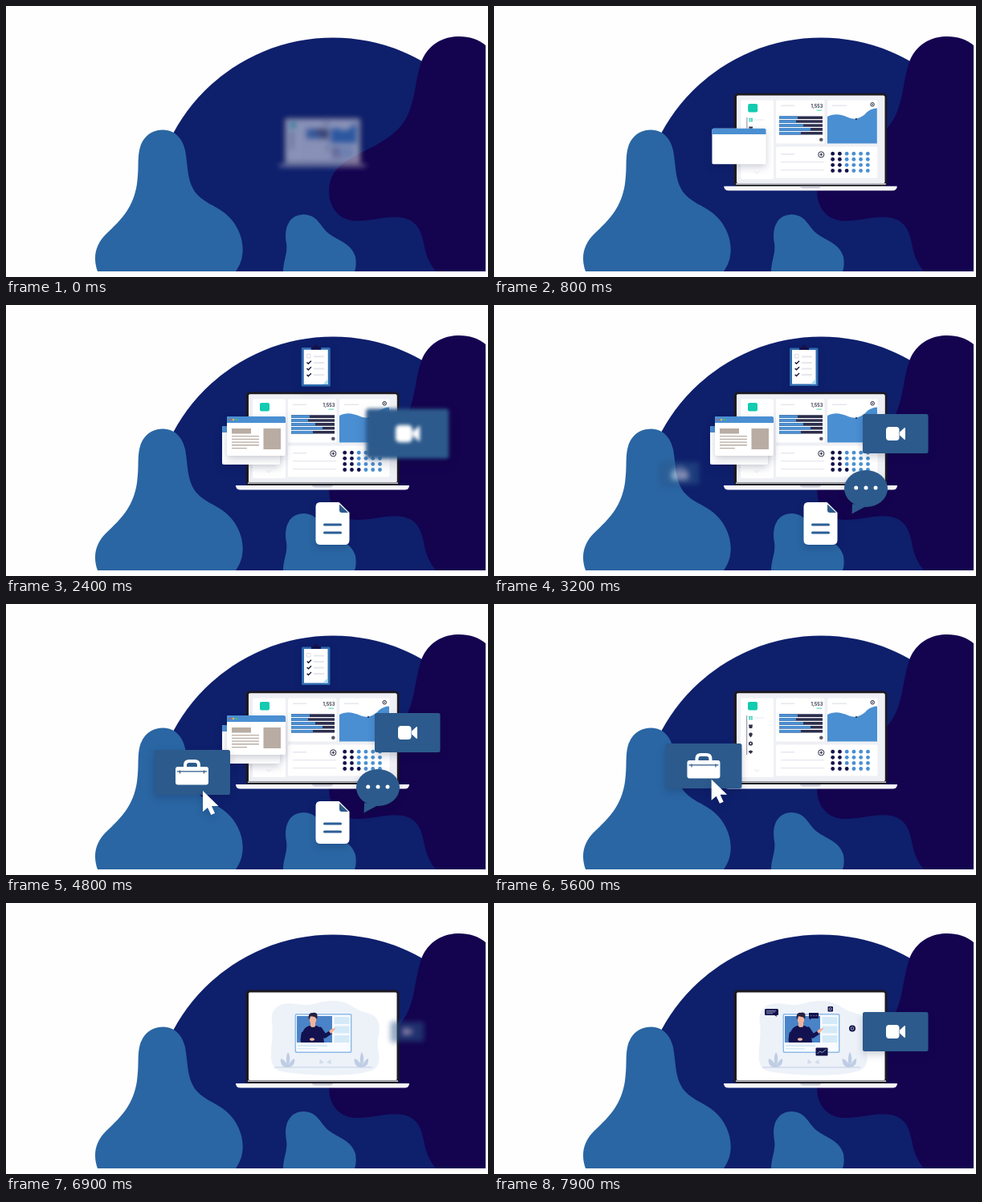
Animation, 600 px wide and 338 px high, one loop 8000 ms. Source, as an HTML page:

```html
<!DOCTYPE html>
<html lang="en">
<head>
<meta charset="utf-8">
<title>Workspace</title>
<style>
html, body { margin: 0; width: 100%; height: 100%; overflow: hidden; background: #fefefe; }
svg { display: block; width: 600px; height: 338px; }
text { font: 700 5.6px Inter, Arial, sans-serif; }
.w { fill: #fff } .n { fill: #14124a } .b { fill: #4a8fd2 } .k { fill: #2c5a8c }
.s { fill: #14034f } .m { fill: #2a66a3 } .tan { fill: #b8aca3 } .line { fill: #e6e7ee }
</style>
</head>
<body>
<svg viewBox="0 0 600 338">
  <clipPath id="edge"><path d="M0 0H597V331H0z"/></clipPath>
  <clipPath id="call"><path d="M362 141H406V174H362z"/></clipPath>
  <g clip-path="url(#edge)">
    <circle cx="407" cy="265" r="225.5" fill="#0e1f6c"/>
    <path class="s" d="M597 49C588 41 575 37.5 562 38C538 39 523 53 517 70C508 96 510 125 493 148C474 172 440 181 420 196C405 207 400 222 403 240C406 256 418 268 437 268C457 268 475 261 494 264C513 268 517 282 520 296C523 313 528 322 535 331H597z"/>
    <path class="m" d="M114 331C107 312 113 296 124 285C140 269 158 255 163 222C166 200 163 190 167 176C172 160 184 154.5 196 154.5C211 155 220 166 223 180C227 202 225 219 237 234C250 249 268 250 282 268C296 286 300 312 286 331z"/>
    <path class="m" d="M345 331C345 318 351 308 349 296C346 280 350 261 370 260C388 260 391 275 402 284C414 293 430 296 435 313C436 320 436 326 434 331z"/>
  </g>

  <g id="laptop">
    <rect x="298.5" y="108.5" width="191" height="117" rx="5" fill="#1c1a22"/>
    <rect class="w" x="302" y="111.5" width="184.5" height="109.5" rx="1.5"/>
    <path fill="#b9bac2" d="M301 221.2H488V223H301z"/>
    <g id="dash">
      <rect x="302" y="111.5" width="184.5" height="109.5" rx="1.5" fill="#eff0f5"/>
      <g class="w">
        <rect x="307" y="117.5" width="41" height="98.5" rx="2"/>
        <rect x="351" y="117.5" width="60.5" height="54" rx="2"/>
        <rect x="415" y="117.5" width="62.5" height="54" rx="2"/>
        <rect x="351" y="175.5" width="126.5" height="39" rx="2"/>
      </g>
      <rect x="316" y="122" width="12" height="10.5" rx="2" fill="#12cbb0"/>
      <path stroke="#55576c" stroke-width=".7" d="M314.7 139V188"/>
      <path fill="#12cbb0" d="M317.2 140h2v1.8h-2zM319.8 140h2v1.8h-2zM317.2 142.4h2v1.8h-2zM319.8 142.4h2v1.8h-2z"/>
      <g fill="#30314a">
        <path d="M317 150.5h5l-.7 4.5h-3.6z"/>
        <path d="M319.5 166.4C316 163 317 160.6 319.5 160.6S323 163 319.5 166.4"/>
        <circle cx="319.5" cy="174" r="2.6"/>
        <path d="M316.6 184Q319.5 180.8 322.4 184L319.5 187z"/>
      </g>
      <circle class="w" cx="319.5" cy="174" r=".9"/>
      <path d="M324 206l3 3 3-3" fill="none" stroke="#e4e5ec"/>
      <path class="line" d="M357 123.5h17v1.5h-17zM421 123.5h18v1.5h-18zM324 141.5h12v1h-12zM357 184h17v1.5h-17zM357 194h54v1.3h-54zM357 204h54v1.3h-54z"/>
      <text x="394.5" y="127" fill="#33344a">1,553</text>
      <path fill="#65d9bd" d="M401.5 129.5h6.5v1.2h-6.5z"/>
      <g id="bars"></g>
      <path class="b" d="M415 138C424 133 433 135.5 441 139C450 142.5 456 140 462 135C467 129.5 471 128 477 127.5V171.5H415z"/>
      <circle cx="451" cy="141" r="1" fill="#222"/>
      <circle cx="407.3" cy="166.8" r="2.3" fill="#555767"/>
      <g fill="none" stroke="#2b2c45">
        <circle cx="471.2" cy="122.7" r="2.3"/><circle cx="471.2" cy="122.7" r=".5"/>
        <circle cx="407.3" cy="185.3" r="3.6"/><path d="M405.4 185.3h3.8M407.3 183.4v3.8"/>
      </g>
      <g id="dots"></g>
    </g>
    <g id="scene">
      <path fill="#edf2f9" d="M331 150C328 128 344 123 362 126C382 130 390 121 409 122C430 123 433 134 449 137C468 141 466 158 463 170C461 184 470 197 459 207C440 219 359 215 339 209C322 200 334 177 331 150z"/>
      <path stroke="#c3d0e4" d="M334 205H456"/>
      <g fill="#bfcde4">
        <path id="plant" d="M350 205C342 205 341 197 342 194C347 196 350 200 350 204C348 195 349 189 351 186C355 192 353 200 351 204C353 199 356 195 359 194C360 200 357 205 350 205"/>
        <use href="#plant" x="92" y="4" transform="translate(0 -4)"/>
        <path d="M391 195l5 4-6 2zM404 195l-5 4 6 2z" opacity=".6"/>
      </g>
      <rect x="359.5" y="138" width="71" height="49" rx="2" fill="#8ebbe8"/>
      <rect x="361" y="139.5" width="68" height="46" rx="1" fill="#f8fbff"/>
      <path fill="#4a83c8" d="M362 141H406V174H362z"/>
      <path fill="#d5eaf8" d="M408.5 142h19v9h-19zM408.5 153.5h19v9h-19zM408.5 165h19v9h-19zM363 177h37v2h-37zM363 181h24v1.4h-24z"/>
      <g clip-path="url(#call)">
        <path fill="#121250" d="M367 175C367 162 371 154 378 153H386C393 154 395 163 396 175z"/>
      </g>
      <path fill="none" stroke="#121250" stroke-width="5" stroke-linecap="round" stroke-linejoin="round" d="M370 163L369 171L378 171M391 157L397 166L403 162"/>
      <g fill="#f2b49c">
        <path d="M379 149h6v5q-3 2-6 0z"/><ellipse cx="382" cy="145.5" rx="4.2" ry="5.5"/>
        <path id="hand" d="M402 160l4-3.5 4.5-.5-2 3-4 4z"/><ellipse cx="381" cy="170" rx="3" ry="1.8"/>
      </g>
      <path fill="#26213f" d="M377.3 146C375 139 379 136 382 137C386 135.5 389 138 387 145C385 141 381 142 379 141z"/>
    </g>
    <g id="bits">
      <path class="n" d="M338.5 132h14q1.5 0 1.5 1.5v5q0 1.5-1.5 1.5h-1l.8 2-3-2h-10.8q-1.5 0-1.5-1.5v-5q0-1.5 1.5-1.5zM392 137h12v7h-9l-2 2v-2h-1z"/>
      <path stroke="#a9b9dd" stroke-width=".7" d="M339 134.3h12M339 136h11M339 137.8h8M394 140.5h1.3M397.3 140.5h1.3M400.6 140.5h1.3"/>
      <rect class="n" x="415.5" y="129" width="6.5" height="6.5" rx="1"/>
      <circle class="n" cx="446" cy="156.5" r="4"/>
      <g fill="none" stroke="#dbe4f5" stroke-width=".7"><circle cx="418.7" cy="132.2" r="1.6"/><circle cx="446" cy="156.5" r="1.8"/></g>
      <rect class="n" x="400.5" y="180.5" width="15" height="10" rx="1"/>
      <path fill="none" stroke="#9ed3f2" stroke-width=".8" d="M402.5 188l3-3 3 1.5 2.5-2 2.5-2"/>
    </g>
    <path fill="#f9f9fc" d="M286 225H502Q502 230.5 496 230.5H292Q286 230.5 286 225z"/>
    <path fill="#c9cad4" d="M381 225H407Q407 227.5 403 227.5H385Q381 227.5 381 225z"/>
  </g>

  <g id="back">
    <rect class="w" x="269" y="151" width="72" height="48" rx="2"/>
    <path class="b" d="M269 159v-6q0-2 2-2h68q2 0 2 2v6z"/>
  </g>
  <g id="front">
    <rect class="w" x="275" y="139" width="73" height="49" rx="2"/>
    <path class="b" d="M275 147v-6q0-2 2-2h69q2 0 2 2v6z"/>
    <circle cx="279" cy="143" r="1.2" fill="#e2574c"/><circle cx="283" cy="143" r="1.2" fill="#f0c246"/><circle cx="287" cy="143" r="1.2" fill="#4fc267"/>
    <path class="tan" d="M281 154h24v6.5h-24zM320.5 154h21.5v26h-21.5zM281 163h34v1.3h-34zM281 166.7h34v1.3h-34zM281 170.4h34v1.3h-34zM281 174.1h34v1.3h-34zM281 178h19v1.3h-19z"/>
  </g>
  <g id="doc">
    <path class="w" d="M391 246H414.5L427.5 259V293Q427.5 299 421.5 299H391.5Q385.5 299 385.5 293V252Q385.5 246 391 246z"/>
    <path class="k" d="M415 248.5V256Q415 259 418 259H426z"/>
    <path stroke="#2c5f96" stroke-width="3" stroke-linecap="round" d="M396.5 274H416.5M396.5 284H416.5"/>
  </g>
  <g id="clip">
    <rect x="368" y="53.5" width="35.5" height="47.5" rx="1.5" fill="#2e6cb0"/>
    <path class="w" d="M371 56H400.5V98.5H371z"/>
    <path class="n" d="M380 56v-3h3q0-3 3-3t3 3h3v3z"/>
    <path class="line" d="M383 63.5h13v2h-13zM383 71h13v2h-13zM383 78.5h13v2h-13zM383 86h13v2h-13z"/>
    <path fill="none" stroke="#d4d5de" stroke-width=".8" d="M374.5 61.5h4.5v4.5h-4.5z"/>
    <path fill="none" stroke="#15153d" stroke-width="1.4" d="M374.7 71.5l1.8 1.8 3.5-3.5M374.7 79l1.8 1.8 3.5-3.5M374.7 86.7l1.8 1.8 3.5-3.5"/>
    <path fill="#a9dff0" d="M400.5 92l-6 6.5h6z"/>
  </g>
  <g id="video">
    <rect class="k" x="459" y="136" width="81.5" height="49" rx="2.5"/>
    <rect class="w" x="488" y="152" width="16.5" height="17" rx="4"/>
    <path class="w" d="M505 158.5l6-5.5q1 0 1 1v13q0 1-1 1l-6-5.5z"/>
  </g>
  <g id="chat">
    <path class="k" d="M446 248L445.5 260.5L463 251z"/>
    <ellipse class="k" cx="463" cy="229" rx="27" ry="23"/>
    <g class="w"><circle cx="450.7" cy="228" r="2.5"/><circle cx="463" cy="228" r="2.5"/><circle cx="475" cy="228" r="2.5"/></g>
  </g>
  <g id="work">
    <rect class="k" x="-47.5" y="-28" width="95" height="56" rx="2.5"/>
    <path fill="none" stroke="#fff" stroke-width="4" d="M-8.5 -5V-9Q-8.5 -14 -3.5 -14H3.5Q8.5 -14 8.5 -9V-5"/>
    <rect class="w" x="-20.5" y="-7" width="41" height="22.5" rx="3"/>
    <path stroke="#2c5a8c" stroke-width="1.2" d="M-18.5 -1.2H18.5M-15 -2.5v4M15 -2.5v4"/>
  </g>
  <path id="cursor" class="w" d="M0 0V26L6 21L10.3 30L15 28L11 19H19.5z"/>
</svg>
<script>
const $ = id => document.getElementById(id);
const clamp = x => Math.max(0, Math.min(1, x));
const ramp = (t, a, b) => clamp((t - a) / (b - a));
const ease = x => x * x * (3 - 2 * x);
const mix = (a, b, p) => a + (b - a) * p;

$('bars').innerHTML = [378, 376, 385, 394, 382].map((x, i) => {
  const y = 137.3 + i * 4.9;
  return `<path fill="#2c2e4c" d="M355 ${y}H409v3.6H355z"/><path class="b" d="M355 ${y}H${x}v3.6H355z"/>`;
}).join('');
for (let i = 0; i < 24; i++) {
  const col = i % 6, row = i / 6 | 0;
  const cls = col < 2 || row == 3 && col == 2 ? 'n' : 'b';
  $('dots').innerHTML += `<circle class="${cls}" cx="${421.7 + col * 8.75}" cy="${184.2 + row * 7.1}" r="2.4"/>`;
}

// Blurred fade combined with a damped spring in scale
function pop(age) {
  if (age <= 0) return { scale: 0, alpha: 0, blur: 0 };
  return {
    scale: 1 - Math.exp(-.0067 * age) * Math.cos(Math.PI * age / 200),
    alpha: clamp(age / 100),
    blur: age < 500 ? 13 * Math.exp(-age / 75) : 0
  };
}

function put(id, x, y, { scale, alpha, blur }, shadow = 1, local) {
  const el = $(id);
  el.style.opacity = alpha;
  el.setAttribute('transform', `translate(${x} ${y}) scale(${scale})` + (local ? '' : `translate(${-x} ${-y})`));
  el.style.filter = (blur > .1 ? `blur(${blur}px) ` : '') +
    (shadow ? 'drop-shadow(0 4px 5px rgba(10,15,60,.2))' : '') || 'none';
}

function leave(state, q) {
  return { scale: state.scale * (1 - .7 * q * q), alpha: state.alpha * (1 - q), blur: state.blur + 5 * q };
}

// id, centre, entry time, exit time
const parts = [
  ['back', 305, 175, 450, 5150], ['front', 311.5, 163.5, 900, 5100],
  ['doc', 406.5, 272.5, 1350, 5050], ['clip', 386, 76, 1800, 5000],
  ['video', 499.7, 160.5, 2250, 4950], ['chat', 463, 231, 2700, 4900]
];

function draw(t) {
  put('laptop', 394, 170, pop(t + 50), 0);
  for (const [id, x, y, start, end] of parts)
    put(id, x, y, leave(pop(t - start), ease(ramp(t, end, end + 300))));
  if (t > 6850) put('video', 499.7, 160.5, pop(t - 6850));

  const move = ease(ramp(t, 5400, 6150)), gone = ease(ramp(t, 6350, 6700));
  const card = leave(pop(t - 3150), gone);
  card.scale *= 1 - .06 * Math.sin(Math.PI * ramp(t, 4580, 4780));
  put('work', mix(231.5, 398, move), mix(210, 165, move), card, 1, true);

  const enter = ease(ramp(t, 3750, 4250));
  put('cursor', mix(mix(258, 245, enter), 390, move), mix(mix(246, 233, enter), 152, move),
    { scale: 1, alpha: ramp(t, 3750, 3950) * (1 - ramp(t, 6150, 6600)), blur: 0 }, 1, true);

  $('dash').style.opacity = 1 - ramp(t, 6450, 6750);
  put('scene', 396, 168, pop(t - 6600), 0);
  put('bits', 392, 161, { scale: mix(.92, 1, ease(ramp(t, 7050, 7500))), alpha: ramp(t, 7050, 7400), blur: 0 }, 0);
}

const began = performance.now();
(function tick() {
  draw((performance.now() - began) % 8000);
  requestAnimationFrame(tick);
})();
</script>
</body>
</html>
```
